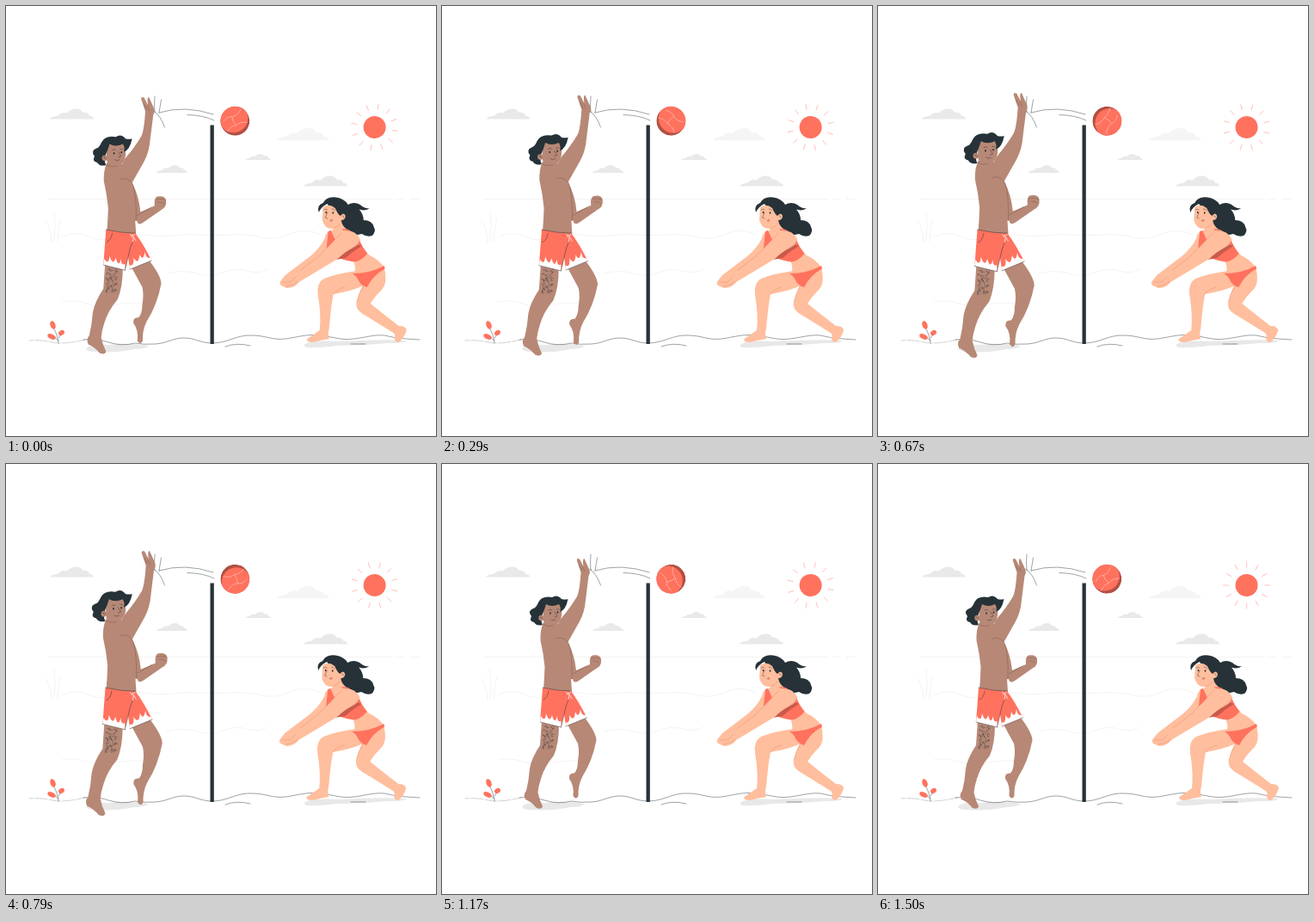
These frames come from a looping animation (500 px wide and 500 px high, 1.54 s). An HTML page:

```html
<!DOCTYPE html>
<html lang="en">
<head>
<meta charset="utf-8">
<title>Beach volleyball</title>
<style>
html, body { margin: 0; width: 100%; height: 100%; overflow: hidden; background: #fff; }
svg { display: block; width: 100%; height: 100%; }
.red { fill: #ff725e; }
.dark { fill: #263238; }
.tan { fill: #b78876; }
.peach { fill: #ffbe9d; }
.shadow { fill: #e8e8e8; }
.line { fill: none; stroke: #263238; stroke-width: .45; stroke-linecap: round; stroke-linejoin: round; }
.faint { fill: none; stroke: #ebebeb; stroke-width: .6; }
.fold { fill: none; stroke: #7d574a; stroke-width: .45; stroke-linecap: round; }
.blush { fill: none; stroke: #e58a6c; stroke-width: .45; stroke-linecap: round; }
</style>
</head>
<body>
<svg viewBox="0 0 500 500">
  <defs>
    <path id="cloud" d="M0 12Q1 9 10 8Q13 3 20 5Q24 0 31 0Q36 0 38 4Q45 4 46 8Q51 9 51 12Z"/>
    <clipPath id="ballClip"><circle r="17"/></clipPath>
  </defs>

  <g class="faint">
    <path d="M48 224.500H450M454 224.500H463M470 224.500H481"/>
    <path d="M65 269Q80 261 96 268T128 269T160 266T194 267T226 266T262 266T298 269T330 265T366 266"/>
    <path d="M188 311Q206 306 222 311T252 310T280 308T304 306M65 344Q80 341 94 346T122 348T160 345"/>
    <path d="M53 275Q52 258 46 249M56 274Q58 255 56 238M60 274Q60 260 64 247"/>
  </g>
  <g fill="#e9e9e9">
    <use href="#cloud" x="51" y="119.500"/>
    <use href="#cloud" transform="translate(174.500 185) scale(.72 .75)"/>
    <use href="#cloud" transform="translate(278 172) scale(.59)"/>
    <use href="#cloud" transform="translate(315 142) scale(1.190)" fill="#f5f5f5"/>
    <use href="#cloud" x="346" y="197.500"/>
  </g>

  <g id="sun"><circle class="red" r="13"/></g>

  <path class="shadow" d="M93 399Q95 393 120 394Q145 391 165 395Q166 398 150 399Q125 404 103 402Q95 402 93 399Z"/>
  <path class="shadow" d="M347 394Q352 388 390 390Q440 387 465 389Q467 392 445 392Q415 395 385 395Q360 398 350 397Q346 396 347 394Z"/>
  <path class="line" stroke-dasharray="5 2 8 1" style="stroke:#999" d="M27 389Q42 388 54 391T92 388"/>
  <path class="line" d="M90 388Q105 386 119 391Q135 396 150 392Q160 394 174 393C188 392 194 386 207 386C220 386 226 392 240 392C258 392 268 382 286 383C302 383 310 389 325 387C340 385 350 381 366 383C382 385 390 389 405 387C420 385 428 382 440 383Q455 387 466 387L481 388"/>
  <path class="line" d="M255 396Q268 391 284 395M401 393H418"/>

  <path class="line" d="M61 392Q60 382 55 374M61 389Q58 386 56 386M61 386L64 382"/>
  <g class="red">
    <ellipse cx="54.500" cy="371" rx="3" ry="5" transform="rotate(-20 54.500 371)"/>
    <ellipse cx="53" cy="384.500" rx="5" ry="2.700" transform="rotate(25 53 384.500)"/>
    <ellipse cx="64.500" cy="380" rx="3.700" ry="2.800" transform="rotate(-35 64.500 380)"/>
  </g>

  <rect class="dark" x="237.500" y="138.500" width="4.300" height="254.500"/>
  <path class="line" d="M173 105Q172 115 173 124M180.500 109L178 124M172 122Q180 128 184.500 141M178 124Q208 115 241 126M211 126.500Q230 127 242 133"/>

  <g id="man">
    <path class="tan" d="M146 303L166 295Q179 312 179.500 321Q175 345 163 364Q158 374 158.500 386Q156 391 152.500 386Q154 374 148 366Q147 359 154 359.500Q158 355 158 345Q160 334 158 325Z"/>
    <path class="tan" d="M116 298L136 303Q136 325 130 339Q119 352 115 366Q112 375 111.500 382Q113 390 117 398Q116 402 110 400Q103 392 97 390Q94 384 98 380Q101 368 102 354Q104 342 114 327Z"/>
    <g id="tattoo" class="line" opacity=".75"></g>
    <path class="tan" d="M118 184Q114 193 114.500 205Q118 220 119.500 236Q119 250 118 262Q134 266 151 265L150 250L152 250Q153 256 159 252L179 238Q186 235 185 227Q184 221 175 222.500Q171 224 172 233L156 240Q154 221 146.500 207L160 183Q166 172 167 158L170.500 130Q173 126 171 122L165.500 110Q163 110 164.500 119L160 110.500Q156 109 157 113L161.500 126Q160 148 157 154Q150 166 139 179L135 186Z"/>
    <path class="fold" d="M147 208Q152 222 151 250M152 244Q158 241 168 235M146.500 207Q140 200 133 203M174 226Q180 224 184 227M176 229Q180 228 183 231M164 120L166 125M160 118L163 124"/>
    <path class="tan" d="M117 163L137 162Q141 172 138 181Q135 188 128 188Q121 187 118 183Z"/>
    <path class="fold" d="M118 187Q124 190 129 188"/>
    <path class="dark" d="M112 161Q116 153 128 155Q134 151 139 157Q143 158 146.500 157Q144 170 137 172Q139 167 136 163Q128 167 121 163Q119 170 117 174Q114 182 117 187Q110 189 107 184Q101 183 104 177Q99 171 106 168Q109 168 112 161Z"/>
    <circle class="tan" cx="115.500" cy="179" r="3.200"/>
    <path class="line" d="M124 170Q126 168 128 170M133 169Q135 168 136 169M131 172L134 177L131 178M127 181Q129 183 132 181M114 178Q116 177 117 180"/>
    <ellipse class="dark" cx="126" cy="173.500" rx=".8" ry="1.200"/>
    <ellipse class="dark" cx="134.500" cy="172.500" rx=".8" ry="1.200"/>
    <path class="red" d="M117 260Q134 264 150 264Q159 276 168.500 295L144 305L142 291L138.500 306L114 300Z"/>
    <path fill="#fff" d="M114 300L115 293Q120 301 121 290Q125 302 128 292Q131 304 134 293Q134 301 138.500 299L138.500 306ZM144 305L143.500 300Q149 303 148 292Q154 301 155 288Q159 297 161 285Q162 293 167 292L168.500 295Z"/>
    <path class="line" d="M114 300L138.500 306M144 305L168.500 295M117 260Q134 264 150 264M138.500 306L142 291Q144 280 147 274M118 274Q123 272 124 264"/>
    <path fill="none" stroke="#fff" stroke-width=".7" d="M144 265L148 268L147 274M148 268L151 273M145 268L150 265"/>
  </g>

  <g id="woman">
    <path class="peach" d="M440 306Q445 324 435 332Q428 339 424 346Q440 359 457 372Q465 372 466 377Q464 385 457 391Q453 391 452 387Q454 381 449 379Q430 367 415 358Q406 352 408 345Q410 335 416 323Z"/>
    <path class="peach" d="M378 261Q372 263 371 270Q365 282 354 291L325 313L340 319L388 285Z"/>
    <path class="dark" d="M364 240Q361 232 369 229Q373 221 384 222.500Q394 224 398 231Q405 227 412 231Q417 236 423 235Q419 239 411 236.500Q416 242 416 249Q426 249 428 257Q431 262 426 267Q420 269 414 265Q404 268 399 263Q389 261 385 250L374 230Q367 233 364 240Z"/>
    <path class="peach" d="M369 234Q376 229 383 235Q386 242 389 244Q393 239 395 244Q395 249 390 249Q391 257 399 261Q408 264 411 272Q415 283 423 290Q434 295 440 304Q444 318 435 330L410 325Q400 315 406 309Q407 302 404 296Q395 297 384 290Q375 277 377 263L381 259Q371 260 368 249Z"/>
    <path class="red" d="M375 262L373 281L379 288Q390 296 405 297.500Q413 297 420.500 288L415 280L410 270L399 260L391 259L399 269L383 272L378 261Z"/>
    <path fill="#c95a4b" d="M384 295L406 276L414 279Q404 285 395 293Z"/>
    <path class="peach" d="M408 308Q385 311 370 317Q361 322 363 336Q367 360 365 377Q358 382 350 387.500Q350 391 357 391Q369 388 376 387Q374 381 376 375Q378 350 381 335Q400 332 414 326Z"/>
    <path class="red" d="M403 311Q424 311 440 302L441 305.500Q427 313 420 327Q413 325 410 319Q408 314 403 311Z"/>
    <path class="peach" d="M393 261Q407 260 412 271Q411 278 404 281Q394 286 386 294Q366 306 341 321Q336 328 327 328L320 325Q317 322 321 318L325 313L336 311Q353 300 364 291Q379 276 393 261Z"/>
    <path class="blush" d="M390 264Q378 277 364 291L343 307M412 272Q409 278 403 281M322 321L331 321L337 315M326 326Q335 325 340 320M381 335Q385 329 394 327M416 325Q410 335 408 345M382 258Q387 257 389 253"/>
    <path class="line" d="M370 237Q372 235 374 237M379 236Q381 235 383 238M374 240L371.500 246L374 247M377 249.500Q378.500 248 380 249M391 244Q393 243 393 246"/>
    <ellipse class="dark" cx="372.500" cy="240" rx=".8" ry="1.200"/>
    <ellipse class="dark" cx="380.500" cy="240.500" rx=".8" ry="1.200"/>
    <circle class="red" cx="378.500" cy="250" r=".9"/>
  </g>

  <g id="ball">
    <g clip-path="url(#ballClip)">
      <circle r="17" fill="#b25042"/>
      <circle class="red" cx="4" cy="-.200" r="17"/>
      <path d="M-7 -14Q-3 -6 -5 -1Q-3 6 -8 12M5 -13Q9 -6 6 -1Q4 5 9 12M-5 -1Q0 -3 6 -1" fill="none" stroke="#ffc3ba" stroke-width=".6"/>
    </g>
  </g>
</svg>
<script>
const LOOP = 1540, FPS = 24, FRAMES = 37;
const el = id => document.getElementById(id);

function addPath(parent, d, attrs = {}) {
  const path = document.createElementNS('http://www.w3.org/2000/svg', 'path');
  path.setAttribute('d', d);
  for (const name in attrs) path.setAttribute(name, attrs[name]);
  parent.append(path);
}

for (let angle = 0; angle < 360; angle += 30) {
  addPath(el('sun'), 'M0 -20.500V-27.500', {
    transform: `rotate(${angle})`, stroke: '#ff9d90', 'stroke-width': .6
  });
}

let seed = 7;
const random = () => (seed = seed * 16807 % 2147483647) / 2147483647;
let ink = '';
for (let i = 0; i < 70; i++) {
  const y = 304 + random() * 27, x = 118 + random() * 12 - (y - 304) * .05;
  ink += `M${x} ${y}q${random() * 4 - 2} ${random() * 3} ${random() * 3 - 1} ${random() * 2}`;
}
addPath(el('tattoo'), ink);

// Linear interpolation through [phase, value] keys.
function track(keys, p) {
  const i = Math.max(1, keys.findIndex(key => key[0] >= p));
  const [p0, v0] = keys[i - 1], [p1, v1] = keys[i];
  return v0 + (v1 - v0) * (p - p0) / (p1 - p0);
}
const heartbeat = [[0, 1], [.1, 1.1], [.3, 1], [.4, 1], [.5, 1.1], [.6, 1], [1, 1]];
const shake = [0, -1, 2, -4, 4, -4, 4, -4, 2, -1, 0].map((x, i) => [i / 10, x]);

function draw(now) {
  const step = Math.min(FRAMES - 1, Math.floor((now % LOOP + 3) * FPS / 1000));
  const phase = (step + 1) / FRAMES, turn = phase * 360;
  const move = (id, transform) => el(id).setAttribute('transform', transform);
  move('ball', `translate(266.300 133.700) rotate(${turn - 126})`);
  move('sun', `translate(428.600 141) rotate(${turn})`);
  move('man', `translate(142 260) scale(${track(heartbeat, phase)}) translate(-142 -260)`);
  move('woman', `translate(${track(shake, phase)} 0)`);
}

let start;
function tick(now) {
  start ??= now;
  draw(now - start);
  requestAnimationFrame(tick);
}
draw(0);
requestAnimationFrame(tick);
</script>
</body>
</html>
```
